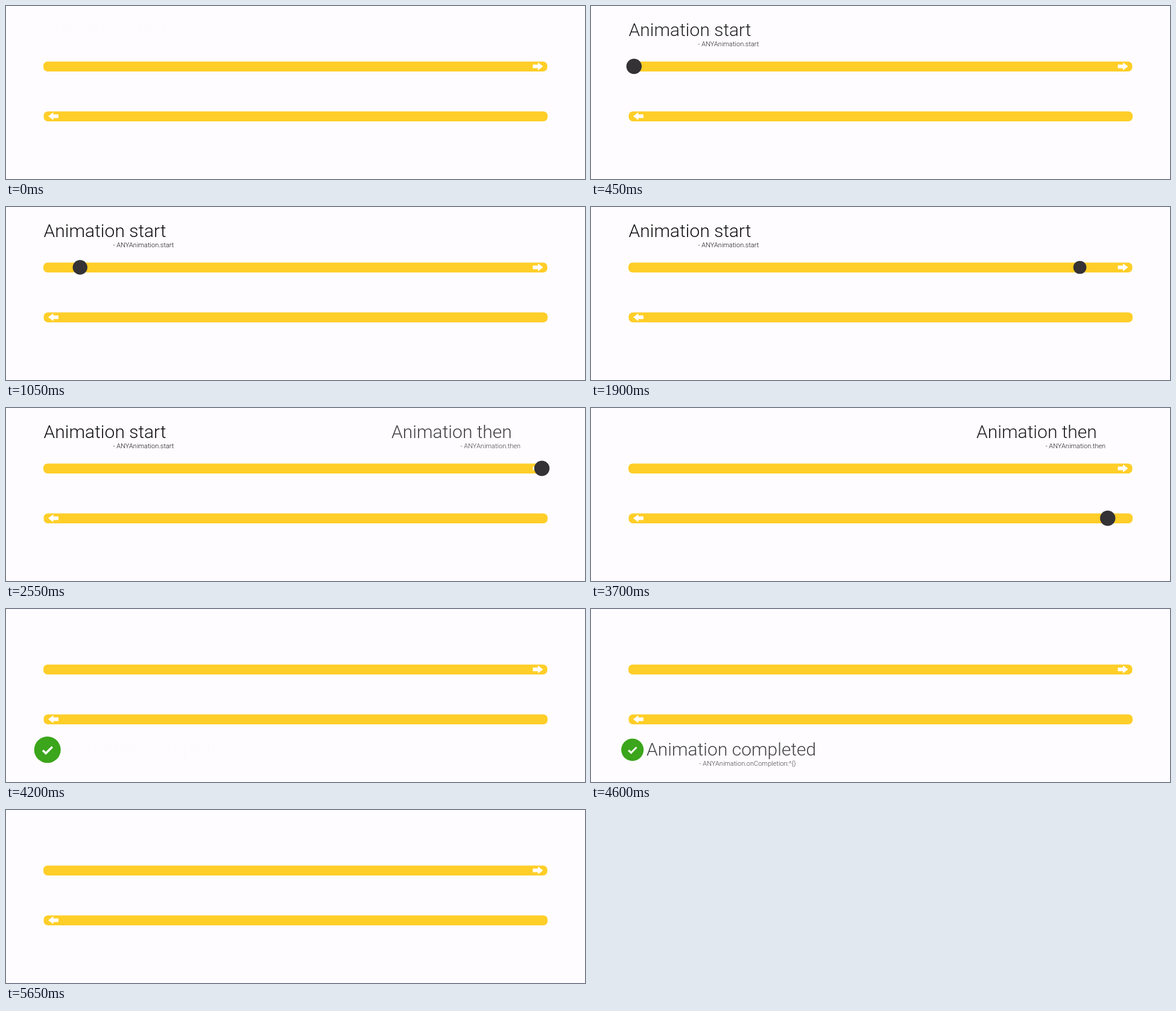
Animation of 960x288 px, one loop 6000 ms. Source, as an HTML page:

```html
<!DOCTYPE html>
<html lang="en">
<head>
<meta charset="utf-8">
<title>Animation chain</title>
<style>
  html, body { margin: 0; width: 100%; height: 100%; overflow: hidden; background: #fefcff; }
  svg { display: block; width: 960px; height: 288px; }
  text { font: 300 30px Roboto, sans-serif; fill: #111; }
  .code { font-size: 11px; }
</style>
</head>
<body>
<svg viewBox="0 0 960 288">
  <defs>
    <path id="arrow" d="M-8.5-3H0V-6.5L8.5 0 0 6.5V3H-8.5Z" fill="#fff"/>
  </defs>
  <g fill="#ffce28">
    <rect x="62" y="92.5" width="835.5" height="16.5" rx="7"/>
    <rect x="62.5" y="175.5" width="835.5" height="16.5" rx="7"/>
  </g>
  <use href="#arrow" x="882" y="100.5"/>
  <use href="#arrow" transform="translate(78.5 183.5) scale(-1 1)"/>
  <g id="start">
    <text x="62.5" y="49.5">Animation start</text>
    <text class="code" x="177.5" y="66.5">- ANYAnimation.start</text>
  </g>
  <g id="then">
    <text x="639" y="49.5">Animation then</text>
    <text class="code" x="753.5" y="66.5">- ANYAnimation.then</text>
  </g>
  <g id="done">
    <text x="92" y="244">Animation completed</text>
    <text class="code" x="179.5" y="260.5">- ANYAnimation.onCompletion:^{}</text>
  </g>
  <g id="check">
    <circle r="18.5" fill="#3ba51b"/>
    <path d="M-6.5.8-2.2 5 6.8-4" fill="none" stroke="#fff" stroke-width="3"/>
  </g>
  <circle id="ball" fill="#343234"/>
</svg>
<script>
const LOOP = 6000, LEFT = 70.5, RIGHT = 888.5, TOP = 100.5, BOTTOM = 183.5, RADIUS = 12.7;
const LANDED = 1945, RETURNED = 3945;
const get = id => document.getElementById(id);
const [start, then, done, check, ball] = ['start', 'then', 'done', 'check', 'ball'].map(get);

const progress = (t, from, to) => Math.min(1, Math.max(0, (t - from) / (to - from)));
const mix = (a, b, p) => a + (b - a) * p;
const easeOut = p => Math.sin(p * Math.PI / 2);
const easeInOut = p => (1 - Math.cos(p * Math.PI)) / 2;
const seconds = (t, from) => Math.max(0, t - from) / 1000;

// Remaining offset of a damped spring, from 1 towards 0
const spring = (s, frequency) => Math.exp(-8 * s) * Math.cos(frequency * s);
const recoil = (s, size) => size * Math.exp(-12 * s) * Math.sin(16 * s);

const fade = (t, inFrom, inTo, outFrom, outTo) =>
  easeOut(progress(t, inFrom, inTo)) * (1 - progress(t, outFrom, outTo));

function ballX(t) {
  if (t < LANDED) return mix(LEFT, RIGHT, progress(t, 100, LANDED) ** 4.15);
  if (t < RETURNED) {
    return mix(RIGHT, LEFT, progress(t, 3576, RETURNED) ** 3) + recoil(seconds(t, LANDED), 92);
  }
  return LEFT - recoil(seconds(t, RETURNED), 26);
}

function ballRadius(t) {
  const shrink = t < LANDED ? progress(t, 100, LANDED) ** 2 : spring(seconds(t, LANDED), 20);
  return RADIUS * (1 - spring(seconds(t, 50), 20)) * (1 - 0.155 * shrink);
}

function draw(now) {
  const t = now % LOOP;
  start.setAttribute('opacity', fade(t, 0, 600, 2900, 3200));
  then.setAttribute('opacity', fade(t, 2200, 2800, 3690, 3900));
  done.setAttribute('opacity', fade(t, 4200, 4900, 5450, 5650));

  ball.setAttribute('cx', ballX(t));
  ball.setAttribute('cy', mix(TOP, BOTTOM, easeInOut(progress(t, 2970, 3510))));
  ball.setAttribute('r', ballRadius(t));
  ball.setAttribute('opacity', 1 - progress(t, 3980, 4180));

  const size = 1 - spring(seconds(t, 4000), 14);
  check.setAttribute('transform', `translate(68.7 234.3) scale(${size})`);
  check.setAttribute('opacity', 1 - progress(t, 5450, 5650));
  requestAnimationFrame(draw);
}
draw(0);
</script>
</body>
</html>
```
